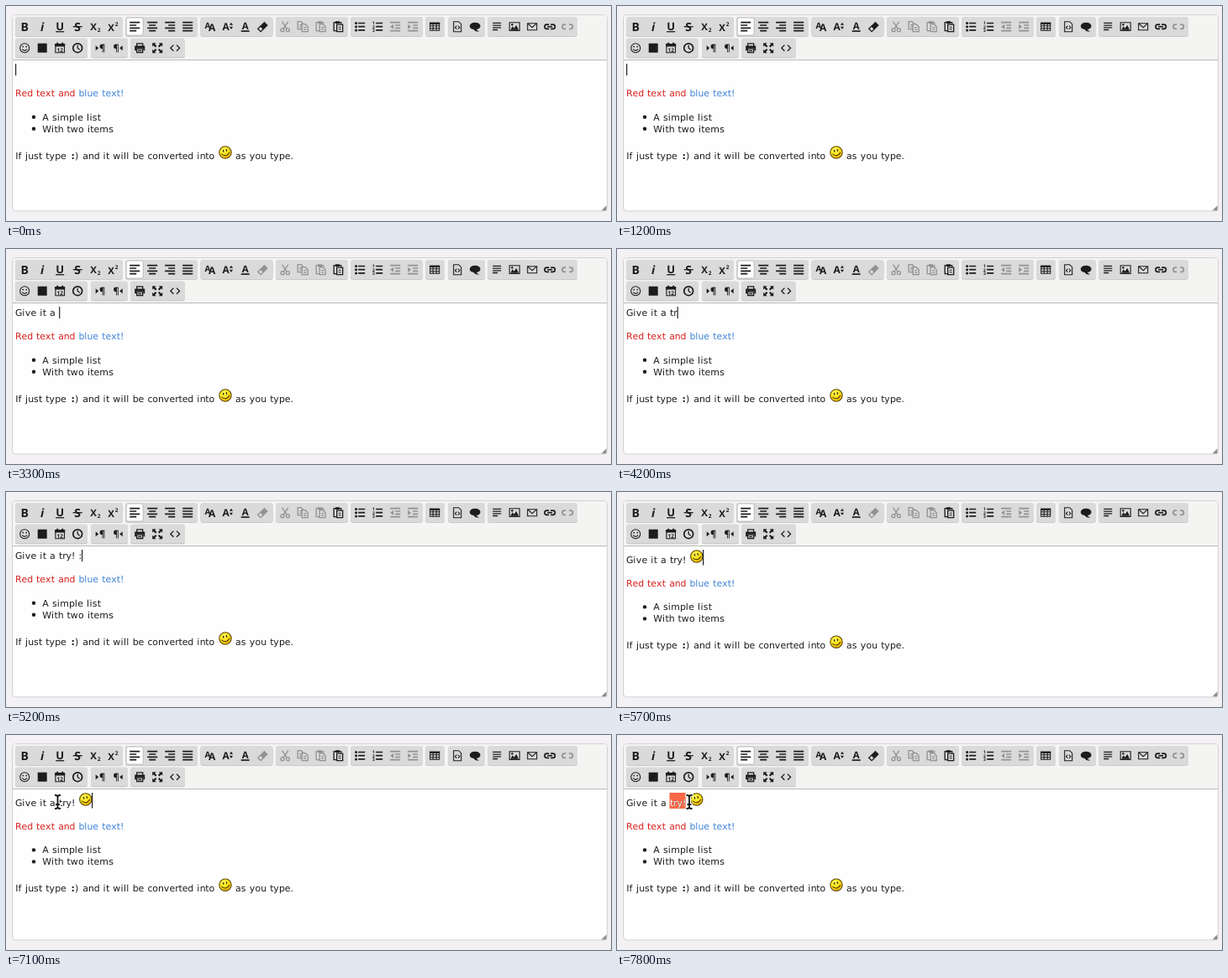
An HTML page for the animation above (8000 ms loop, 720x257 px).

```html
<!DOCTYPE html>
<html lang="en">
<head>
<meta charset="utf-8">
<title>Editor demo</title>
<style>
html, body { margin: 0; width: 100%; height: 100%; overflow: hidden; background: #f3f1f4; }
svg { display: block; }
text { white-space: pre; text-rendering: geometricPrecision; }
.copy { font: 10.92px "DejaVu Sans", sans-serif; fill: #1c1c1c; }
.icon { color: #1c1c1c; fill: currentColor; font-family: "Open Sans", sans-serif; font-weight: 700; text-anchor: middle; }
.off { color: #929292; }
.icon .o { fill: none; stroke: currentColor; stroke-width: 1.3; }
.icon .bars { stroke-width: 1.7; }
.icon .thin { stroke-width: 1.1; }
.icon .w { fill: #dadada; }
</style>
</head>
<body>
<svg id="stage" width="720" height="257" viewBox="0 0 720 257">
  <defs>
    <radialGradient id="sun" cx=".38" cy=".3" r=".75">
      <stop offset="0" stop-color="#fff75a"/>
      <stop offset=".55" stop-color="#fbe014"/>
      <stop offset="1" stop-color="#e6a400"/>
    </radialGradient>
    <g id="smiley">
      <circle r="7.2" fill="url(#sun)" stroke="#5d4808" stroke-width="1.1"/>
      <g transform="rotate(-12)">
        <g fill="#2d2103"><ellipse cx="-1.9" cy="-2.2" rx=".7" ry="1.5"/><ellipse cx="1.9" cy="-2.2" rx=".7" ry="1.5"/></g>
        <path d="M-4.6 1.2Q0 6.4 4.6 1.2" fill="none" stroke="#3d2c04" stroke-linecap="round"/>
      </g>
    </g>
  </defs>
  <rect width="720" height="257" fill="#f3f1f4"/>
  <rect x="7.5" y="10.5" width="708" height="234.5" rx="4" fill="#fefefe" stroke="#d2d1d3"/>
  <path d="M8 64.5V14q0-3 3-3H712q3 0 3 3V64.5Z" fill="#f4f5f3"/>
  <path d="M8 64.5H715" stroke="#b9b9b9"/>
  <path d="M708.5 244.5L714.5 238.5V244.5Z" fill="#8b8b8b"/>
  <g id="bar"></g>
  <rect id="mark" x="62.5" y="69" height="19" fill="#fb6847"/>
  <g id="doc"></g>
  <rect id="caret" y="69" width="1.1" fill="#111"/>
  <g id="arrow"><path d="M0 0V16.5L3.9 12.9L6.7 19.2L9.5 18L6.8 11.8H12Z" fill="#fff" stroke="#111" stroke-width="1.7" stroke-linejoin="round"/></g>
  <g id="beam" fill="none" stroke-linecap="square">
    <path id="beamShape" d="M-2.6 -8Q0 -8 0 -6Q0 -8 2.6 -8M0 -6V6M-2.6 8Q0 8 0 6Q0 8 2.6 8M-1.5 3H1.5" stroke-width="4" stroke="#fff"/>
    <path d="M-2.6 -8Q0 -8 0 -6Q0 -8 2.6 -8M0 -6V6M-2.6 8Q0 8 0 6Q0 8 2.6 8M-1.5 3H1.5" stroke-width="1.8" stroke="#111"/>
  </g>
</svg>
<script>
const $ = id => document.getElementById(id);
const make = (tag, attrs, parent) => {
  const el = document.createElementNS('http://www.w3.org/2000/svg', tag);
  for (const k in attrs) el.setAttribute(k, attrs[k]);
  return parent.appendChild(el);
};
const show = (el, on) => el.setAttribute('visibility', on ? 'visible' : 'hidden');
const place = (el, x, y) => el.setAttribute('transform', `translate(${x} ${y})`);

// ---- toolbar icons, drawn around 0,0
const line = (d, more = '') => `<path class="o ${more}" d="${d}"/>`;
const bars = d => line(d, 'bars');
const fill = d => `<path d="${d}"/>`;
const glyph = (s, size, x = 0, y = 5, more = '') => `<text x="${x}" y="${y}" font-size="${size}" ${more}>${s}</text>`;
const rows = (a, b) => bars([-5, -1.7, 1.7, 5].map((y, i) => {
  const [l, r] = i % 2 ? b : a;
  return `M${l} ${y}H${r}`;
}).join(''));
const full = [-6, 6];
const page = (x, y) => line(`M${x} ${y}h4l3 3v6h-7z`, 'w') + line(`M${x + 2} ${y + 4}h3M${x + 2} ${y + 6.5}h3`);
const board = line('M-1 5H-5V-5H3.5V-3') + fill('M-3.2 -6.5h5v2.8h-5z');
const indent = d => bars('M-6 -5H6M0 -1.7H6M0 1.7H6M-6 5H6') + fill(d);
const chain = gap => bars(`M${-gap} -2.6H-3.6a2.6 2.6 0 0 0 0 5.2H${-gap}M${gap} -2.6H3.6a2.6 2.6 0 0 1 0 5.2H${gap}`);
const listLines = bars('M-2 -4.2H6M-2 0H6M-2 4.2H6');
const icons = {
  bold: glyph('B', 14),
  italic: glyph('i', 14, 0, 5, 'font-style="italic"'),
  under: glyph('U', 13, 0, 4) + line('M-5 6H5'),
  strike: glyph('S', 14) + line('M-5.5 0H5.5'),
  sub: glyph('X', 11.5, -2, 4) + glyph('2', 6.5, 4.5, 6),
  sup: glyph('X', 11.5, -2, 5) + glyph('2', 6.5, 4.5, -1),
  left: rows(full, [-6, 2]),
  center: rows(full, [-4, 4]),
  right: rows(full, [-2, 6]),
  justify: rows(full, full),
  font: glyph('A', 10, -2.8, 2) + glyph('A', 12, 2.5, 5),
  size: glyph('A', 12, -2, 4) + fill('M2.2 -2L4.3 -5L6.4 -2ZM2.2 0L4.3 3L6.4 0Z'),
  color: glyph('A', 11.5, 0, 3) + fill('M-5 4.5H5V6.2H-5Z'),
  eraser: `<g transform="rotate(-45)"><path d="M-1.5 -3H5.5V3H-1.5Z"/><path class="o" d="M-6 -2.4H-1.5V2.4H-6Z"/></g>`,
  cut: line('M-2 2.4L3.6 -6M2 2.4L-3.6 -6') + '<circle class="o" cx="-3.2" cy="4" r="2"/><circle class="o" cx="3.2" cy="4" r="2"/>',
  copy: page(-6, -6) + page(-1, -3),
  paste: board + page(-1, -3),
  pasteText: board + line('M-1.5 -2.5H5.5V6H-1.5Z', 'w') + line('M.5 .5H3.5M.5 3H3.5', 'thin'),
  bullets: listLines + [-4.2, 0, 4.2].map(y => `<circle cx="-4.6" cy="${y}" r="1.5"/>`).join(''),
  numbers: listLines + [1, 2, 3].map(n => glyph(n, 5, -4.8, n * 4.2 - 6.6)).join(''),
  outdent: indent('M-2 -3V3L-6 0Z'),
  indent: indent('M-6 -3V3L-2 0Z'),
  table: line('M-5.5 -4.5H5.5V4.5H-5.5ZM-5.5 -1H5.5M-5.5 2H5.5M-2 -4V4.5M2 -4V4.5', 'thin') + fill('M-6 -5H6V-2.8H-6Z'),
  code: line('M-4.5 -6H1.5L4.5 -3V6H-4.5ZM-.8 -1L-2.7 1L-.8 3M.8 -1L2.7 1L.8 3', 'thin'),
  quote: fill('M0 -5C8.2 -5 8.2 3 1.5 3.2Q3 5 5 5.5Q0 6.5 -1.5 3.2C-8.2 3 -8.2 -5 0 -5Z'),
  rule: line('M-5 -4.3H5M-5 -1.6H5M-5 1.1H5M-5 3.8H1'),
  image: line('M-6 -5H6V4.8H-6Z', 'thin') + fill('M-5 4L-2.5 -.5L-.5 2L2 -2L5 4Z') + '<circle cx="-2.8" cy="-2.5" r="1.2"/>',
  mail: line('M-5.5 -4H5.5V4H-5.5ZM-5.5 -4L0 1L5.5 -4', 'thin'),
  link: chain(1) + bars('M-3 0H3'),
  unlink: chain(2),
  smile: '<circle class="o thin" r="5.5"/><circle cx="-2" cy="-1.6" r=".9"/><circle cx="2" cy="-1.6" r=".9"/>' + line('M-3 1.5Q0 4.8 3 1.5', 'thin'),
  video: fill('M-5.5 -5.5H5.5V5.5H-5.5Z'),
  date: line('M-5.3 -4.5H5.3V5.5H-5.3Z', 'thin') + fill('M-6 -5.2H6V-1.8H-6ZM-4 -6.5h2v2h-2zM2 -6.5h2v2h-2z') + glyph('12', 6.5, 0, 4.4),
  time: '<circle class="o bars" r="5.4"/>' + line('M0 -3.5V0L2.5 2'),
  ltr: fill('M-5.5 -3V3L-2 0Z') + glyph('¶', 11, 2.3, 4),
  rtl: glyph('¶', 11, -2, 4) + fill('M5.5 -3V3L2 0Z'),
  print: line('M-3.5 -2V-5.3H3.5V-2M-3.5 1H3.5V5.3H-3.5ZM-2 3.2H2') + fill('M-6 -2.8H6V3H4.2V.4H-4.2V3H-6Z'),
  expand: [0, 90, 180, 270].map(a => `<path transform="rotate(${a})" d="M-6 -6H-1.6L-3 -4.6L-.8 -2.2L-2.2 -.8L-4.6 -3L-6 -1.6Z"/>`).join(''),
  source: line('M-1.8 -3.6L-5.4 0L-1.8 3.6M1.8 -3.6L5.4 0L1.8 3.6')
};
const groups = [
  [11, 13, 'bold italic under strike sub sup'],
  [142, 13, 'left center right justify'],
  [231.5, 13, 'font size color eraser'],
  [321, 13, 'cut copy paste pasteText'],
  [410, 13, 'bullets numbers outdent indent'],
  [499, 13, 'table'],
  [526, 13, 'code quote'],
  [573, 13, 'rule image mail link unlink'],
  [11, 38.5, 'smile video date time'],
  [101, 38.5, 'ltr rtl'],
  [148, 38.5, 'print expand source']
];
const disabled = 'cut copy paste outdent indent unlink'.split(' ');
const buttons = {};
for (const [x, y, list] of groups) {
  const names = list.split(' '), width = names.length * 21 + 2;
  make('rect', { x, y: y + .8, width, height: 23, rx: 3, fill: '#bdbdbd' }, $('bar'));
  make('rect', { x, y, width, height: 23, rx: 3, fill: '#dadada' }, $('bar'));
  names.forEach((name, i) => {
    const cx = x + 11.2 + i * 21;
    if (name === 'left') make('rect', { x: cx - 10, y: y + 1, width: 20, height: 21, rx: 2, fill: '#fff', stroke: '#b0b0b0', 'stroke-width': .8 }, $('bar'));
    const icon = make('g', { class: disabled.includes(name) ? 'icon off' : 'icon' }, $('bar'));
    place(icon, cx, y + 11.7);
    icon.innerHTML = icons[name];
    buttons[name] = icon;
  });
}

// ---- document text: whole-pixel advances at 13px with wide word gaps, scaled down
const SCALE = .84, WORD_GAP = 1, LEFT = 10.9;
const pen = document.createElement('canvas').getContext('2d');
const advance = (ch, bold) => {
  pen.font = `${bold ? 'bold ' : ''}100px "DejaVu Sans", sans-serif`;
  return (Math.round(pen.measureText(ch).width * .13) + (ch === ' ' ? WORD_GAP : 0)) * SCALE;
};
const widthOf = (s, bold) => [...s].reduce((w, ch) => w + advance(ch, bold), 0);
const setText = (el, s, x, bold) => {
  const xs = [];
  for (const ch of s) {
    xs.push(x.toFixed(2));
    x += advance(ch, bold);
  }
  el.setAttribute('x', xs.join(' ') || x);
  el.textContent = s;
  return x;
};
const write = (parent, s, x, y, color = '#1c1c1c', bold = false) => {
  const el = make('text', { y, class: 'copy', style: `fill:${color}${bold ? ';font-weight:700' : ''}` }, parent);
  return setText(el, s, x, bold);
};
const smiley = (parent, x, y) => make('use', { href: '#smiley', x, y }, parent);

const doc = $('doc');
const typed = make('text', { class: 'copy' }, doc);
const picked = make('text', { class: 'copy', y: 85, style: 'fill:#fff' }, doc);
const face = smiley(doc, 94.8, 77);
const body = make('g', {}, doc), last = make('g', {}, doc);
const afterRed = write(body, 'Red text and ', LEFT, 108.4, '#d6201d');
write(body, 'blue text!', afterRed, 108.4, '#3f83d6');
['A simple list', 'With two items'].forEach((s, i) => {
  make('circle', { cx: 33, cy: 132.8 + i * 14, r: 2.2, fill: '#1c1c1c' }, body);
  write(body, s, 43.2, 136.6 + i * 14);
});
write(last, 'If just type', LEFT + .3, 183.3);
write(last, ':', 77.4, 183.3, '#1c1c1c', true);
write(last, ')', 82, 183.3);
write(last, 'and it will be converted into', 91.2, 183.3);
smiley(last, 261, 175);
write(last, 'as you type.', 273, 183.3);

// ---- timeline
const LOOP = 8000, PHRASE = 'Give it a try! :';
const keys = [1800, 2100, 2400, 2500, 2700, 2800, 2900, 3000, 3100, 3300, 3900, 4100, 4300, 4500, 4800, 5200];
const CONVERT = 5700, SELECT = 7500;
const moves = [
  [6700, 213.5, 241], [6800, 168, 196], [6900, 112, 138], [7000, 76, 96], [7100, 61.5, 80],
  [7500, 66, 80], [7600, 71, 80], [7700, 79, 80], [7800, 86, 80]
];

function draw(t) {
  const done = t >= CONVERT, selecting = t >= SELECT;
  const count = keys.filter(k => k <= t).length;
  const text = done ? PHRASE.slice(0, -1) : PHRASE.slice(0, count);
  setText(typed, text, LEFT);
  typed.setAttribute('y', done ? 85 : 80.4);
  place(body, 0, done ? 4.6 : 0);
  place(last, 0, done ? 4.2 : 0);
  show(face, done);

  const since = done ? CONVERT : count ? keys[count - 1] : 0;
  show($('caret'), !selecting && Math.floor((t - since) / 600) % 2 === 0);
  $('caret').setAttribute('x', done ? 102 : LEFT + widthOf(text) + .2);
  $('caret').setAttribute('height', done ? 18.5 : 14);

  const chars = selecting ? Math.min(4, 1 + Math.floor((t - SELECT) / 100)) : 0;
  const part = 'try!'.slice(0, chars);
  $('mark').setAttribute('width', widthOf(part));
  setText(picked, part, LEFT + widthOf('Give it a '));
  buttons.eraser.classList.toggle('off', t >= keys[0] && !selecting);

  const at = moves.filter(m => m[0] <= t).pop();
  const overText = at && at[2] < 192;
  show($('arrow'), at && !overText);
  show($('beam'), overText);
  if (at) place(overText ? $('beam') : $('arrow'), at[1], at[2]);
}

const start = performance.now();
function tick() {
  draw((performance.now() - start) % LOOP);
  requestAnimationFrame(tick);
}
tick();
</script>
</body>
</html>
```
